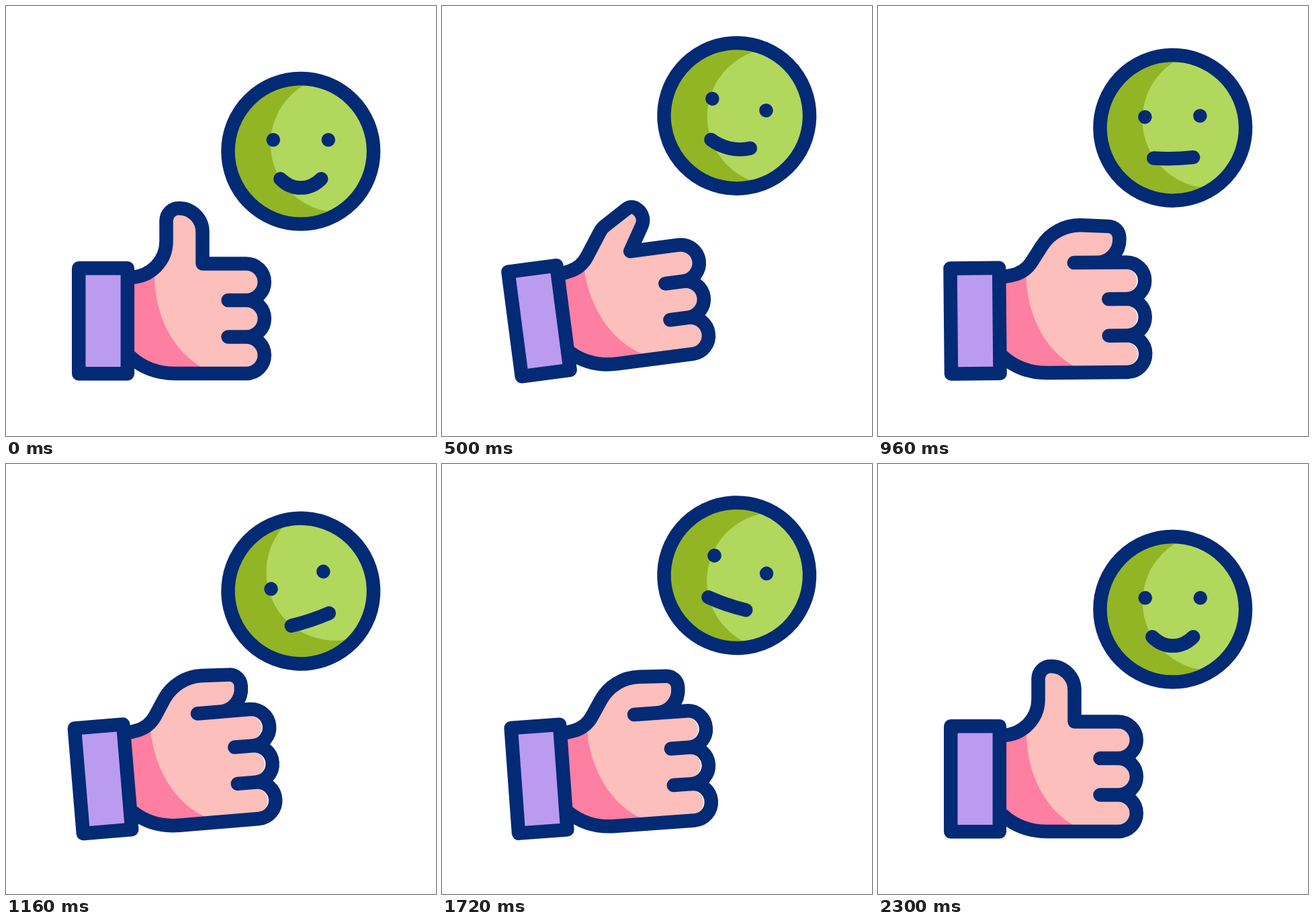
These frames come from a looping animation (640x640 px, 2.4 s). An HTML page with a canvas:

```html
<!DOCTYPE html>
<html lang="en">
<head>
<meta charset="utf-8">
<title>Thumbs up</title>
<style>
html, body { margin: 0; width: 100%; height: 100%; overflow: hidden; background: #fff; }
canvas { display: block; width: 640px; height: 640px; }
</style>
</head>
<body>
<canvas id="stage"></canvas>
<script>
const canvas = document.getElementById('stage');
const ctx = canvas.getContext('2d');
const scale = Math.max(1, window.devicePixelRatio || 1);
canvas.width = canvas.height = 640 * scale;

const LOOP = 2400, LINE = 20.5;
const NAVY = '#032a75', GREEN = '#b2d75d', MOSS = '#92b525';
const PINK = '#fcbfbb', ROSE = '#fd7fa1', LILAC = '#ba9bf0';

// Tracks are [time, value] keys with an ease in and out between them.
const ballY = [[200, 0], [600, -62.5], [1125, -26.6], [1600, -56.5], [2200, 0]];
const faceTurn = [0, 19, -19, 19, 0].map((v, i) => [200 + i * 500, v]);
const handTurn = [[200, 0], [600, -8.8], [900, 0], [1200, -5], [1500, 0], [1800, -5], [2200, 0]];
const foldKeys = [[200, 0], [750, 1], [1800, 1], [2300, 0]];

// Rounded corners [x, y, radius] of the thumb: wrist, knuckle, tip, pad, crease.
const thumbUp = [[238.5, 403.5, 53.5], [238.5, 338, 30], [238.5, 301, 18.7], [292.5, 301, 35.2], [292.5, 383.5, 0]];
const thumbBent = [[217, 398, 45], [255, 344, 30], [303, 315.5, 12], [323, 334, 20], [292.5, 383.5, 0]];
const thumbIn = [[219, 398, 45], [265.5, 326, 67], [360.5, 330.5, 17], [360.5, 383.5, 34], [292.5, 383.5, 0]];
const BENT = 0.57;

const rad = deg => deg * Math.PI / 180;
const mix = (a, b, k) => a + (b - a) * k;
const mixPose = (a, b, k) => a.map((p, i) => p.map((v, j) => mix(v, b[i][j], k)));

function track(keys, t) {
  if (t <= keys[0][0]) return keys[0][1];
  for (let i = 1; i < keys.length; i++) {
    const [t0, v0] = keys[i - 1], [t1, v1] = keys[i];
    if (t < t1) {
      const p = (t - t0) / (t1 - t0);
      return mix(v0, v1, p * p * (3 - 2 * p));
    }
  }
  return keys[keys.length - 1][1];
}

function disc(x, y, r, color) {
  ctx.beginPath();
  ctx.arc(x, y, r, 0, Math.PI * 2);
  ctx.fillStyle = color;
  ctx.fill();
}

function thumbPose(fold) {
  return fold < BENT
    ? mixPose(thumbUp, thumbBent, fold / BENT)
    : mixPose(thumbBent, thumbIn, (fold - BENT) / (1 - BENT));
}

function handPath(thumb, fingerX, r) {
  ctx.beginPath();
  ctx.moveTo(185, 403.8);
  for (let i = 0; i < thumb.length - 1; i++) {
    const [x, y, round] = thumb[i], [nx, ny] = thumb[i + 1];
    ctx.arcTo(x, y, nx, ny, round);
  }
  const [endX, endY] = thumb[thumb.length - 1];
  ctx.lineTo(endX, endY);
  for (let i = 0; i < 3; i++) {
    ctx.arc(fingerX, 410.75 + i * 54.5, r, -Math.PI / 2, Math.PI / 2);
  }
  ctx.lineTo(fingerX, 547);
  ctx.lineTo(252, 547);
  ctx.bezierCurveTo(226, 547, 203, 538.5, 185, 522);
}

function drawHand(turn, fold) {
  const px = 144.75, py = 468.75;
  const thumb = thumbPose(fold);
  const fingerX = 357.5 + 13 * fold;

  ctx.save();
  ctx.translate(px, py);
  ctx.rotate(rad(turn));
  ctx.translate(-px, -py);

  // The skin trails slightly behind the outline at the fingertips.
  ctx.save();
  handPath(thumb, fingerX - 2.6 * fold ** 3, 18);
  ctx.fillStyle = PINK;
  ctx.fill();
  ctx.clip();
  ctx.beginPath();
  ctx.moveTo(180, 380);
  ctx.lineTo(221, 380);
  ctx.lineTo(221, 400);
  ctx.bezierCurveTo(221, 462, 250, 515, 292, 538);
  ctx.lineTo(292, 560);
  ctx.lineTo(180, 560);
  ctx.fillStyle = ROSE;
  ctx.fill();
  ctx.restore();

  handPath(thumb, fingerX, 27.25);
  for (const y of [438, 492.5]) {
    ctx.moveTo(fingerX - 27, y);
    ctx.lineTo(fingerX, y);
  }
  ctx.stroke();

  ctx.beginPath();
  ctx.rect(108.25, 390.2, 72.6, 157);
  ctx.fillStyle = LILAC;
  ctx.fill();
  ctx.stroke();
  ctx.restore();
}

function drawFace(y, turn, flat) {
  ctx.save();
  ctx.translate(438.75, 216.25 + y);
  ctx.rotate(rad(turn));

  ctx.save();
  ctx.beginPath();
  ctx.arc(0, 0, 108, 0, Math.PI * 2);
  ctx.clip();
  disc(0, 0, 108, MOSS);
  disc(57, -11, 102, GREEN);
  ctx.restore();

  ctx.beginPath();
  ctx.arc(0, 0, 108.3, 0, Math.PI * 2);
  ctx.stroke();

  for (const x of [-41, 41]) disc(x, -17, 10.3, NAVY);

  const endX = mix(30.5, 29.5, flat), endY = mix(41, 44.5, flat);
  const bendX = mix(13, 10, flat), bendY = mix(58.8, 46.2, flat);
  ctx.beginPath();
  ctx.moveTo(-endX, endY);
  ctx.bezierCurveTo(-bendX, bendY, bendX, bendY, endX, endY);
  ctx.stroke();
  ctx.restore();
}

function draw(t) {
  ctx.setTransform(scale, 0, 0, scale, 0, 0);
  ctx.fillStyle = '#fff';
  ctx.fillRect(0, 0, 640, 640);
  ctx.strokeStyle = NAVY;
  ctx.lineWidth = LINE;
  ctx.lineCap = ctx.lineJoin = 'round';
  const fold = track(foldKeys, t);
  drawHand(track(handTurn, t), fold);
  drawFace(track(ballY, t), track(faceTurn, t), fold);
}

const start = performance.now();
function tick() {
  draw((performance.now() - start) % LOOP);
  requestAnimationFrame(tick);
}
tick();
</script>
</body>
</html>
```
